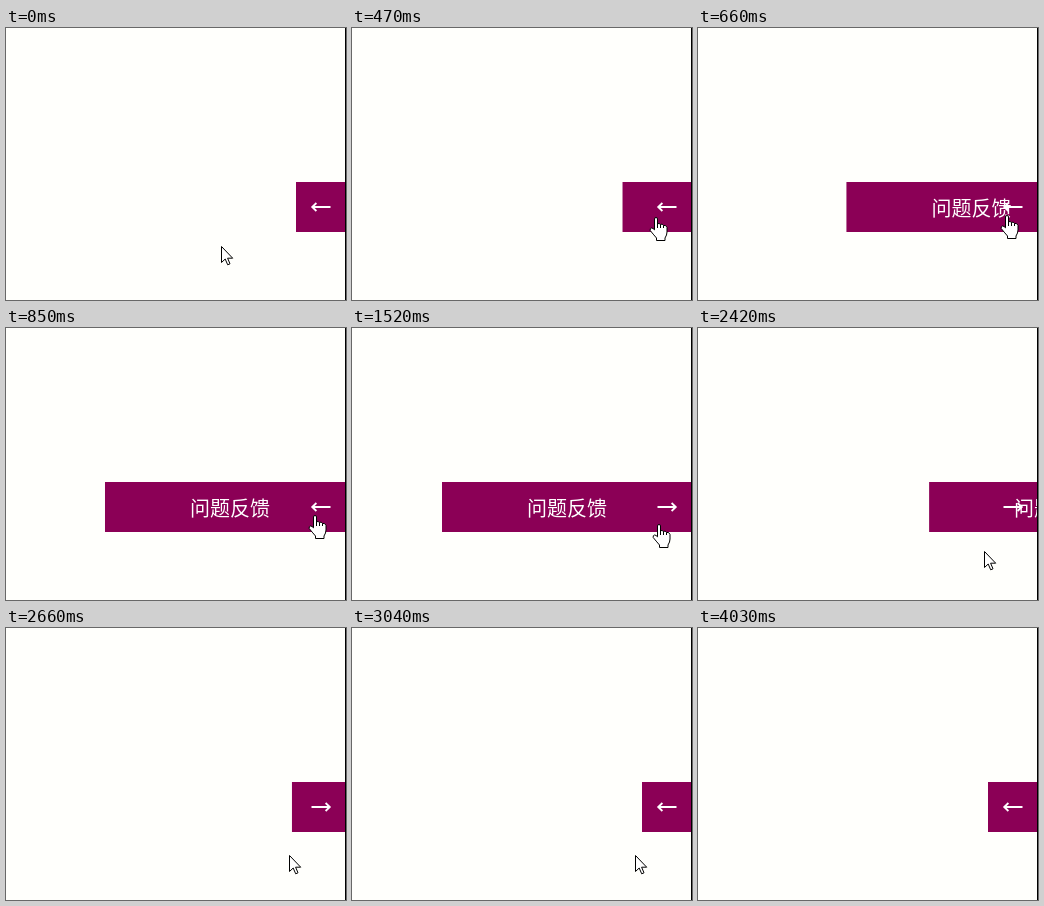
Recreate the animation shown at these times as an HTML page. Size 340 by 272 pixels, loop 5.3 s.

```html
<!DOCTYPE html>
<html lang="zh-CN">
<head>
<meta charset="utf-8">
<title>问题反馈</title>
<style>
  html, body { margin: 0; width: 100%; height: 100%; overflow: hidden; background: #fffffc; }
  svg { display: block; width: 100%; height: 100%; }
  text { font: 20px "Noto Sans CJK SC", "Noto Sans CJK", sans-serif; fill: #fff; }
  .cursor { fill: #fff; stroke: #000; stroke-linejoin: round; }
</style>
</head>
<body>
<svg viewBox="0 0 340 272">
  <g id="panel">
    <rect y="154" width="250" height="50" fill="#8b0056"/>
    <text x="85" y="188">问题反馈</text>
  </g>
  <path id="mark" d="M-9 0H9.5M-4.6-4L-8.8 0L-4.6 4" fill="none" stroke="#fff" stroke-width="1.8"/>
  <rect x="339" width="1" height="272"/>
  <path id="pointer" class="cursor" d="M.5.5V16.5L4.2 13L6.7 18.8L9 17.8L6.6 12.2H11.7Z"/>
  <g id="hand" class="cursor">
    <path d="M-1.5 12V2Q-1.5.5 0 .5T1.5 2V7Q3 5.5 4.5 7.5Q6.3 6.3 7.5 8.5Q10 7.5 11 10.5V15Q11 18 9 21V23.5H.5V21Q-3 17-5.8 13.5Q-6.2 11.3-4.5 11Q-3 11-1.5 12.8Z"/>
    <path d="M1.5 7V11M4.5 7.5V11M7.5 8.5V11" fill="none"/>
  </g>
</svg>
<script>
  const LOOP = 5300, SLIDE = 600;
  const OPEN = 410, CLOSE = 2171;
  const [panel, mark, pointer, hand] =
    ['panel', 'mark', 'pointer', 'hand'].map(id => document.getElementById(id));

  const start = { x: 215, y: 218 };
  const moves = [
    { from: 50, to: 540, x: 309, y: 187 },
    { from: 1519, to: 1520, x: 307, y: 196 },
    { from: 2100, to: 2510, x: 283, y: 227 },
    { from: 3710, to: 4030, x: 278, y: 274 }
  ];

  const clamp = v => Math.min(1, Math.max(0, v));
  const smooth = k => k * k * (3 - 2 * k);

  // cubic-bezier(.25, .1, .25, 1)
  function ease(x) {
    let lo = 0, hi = 1;
    for (let i = 0; i < 24; i++) {
      const s = (lo + hi) / 2;
      if (.75 * s * (1 - s) + s ** 3 < x) lo = s; else hi = s;
    }
    return .3 * lo * (1 - lo) ** 2 + 3 * lo * lo * (1 - lo) + lo ** 3;
  }

  function cursorAt(t) {
    let { x, y } = start;
    for (const m of moves) {
      const k = smooth(clamp((t - m.from) / (m.to - m.from)));
      x += (m.x - x) * k;
      y += (m.y - y) * k;
    }
    return [Math.round(x), Math.round(y)];
  }

  const slide = (t, from) => ease(clamp((t - from) / SLIDE));
  const place = (el, x, y, more = '') => el.setAttribute('transform', `translate(${x} ${y})${more}`);
  const show = (el, on) => el.setAttribute('visibility', on ? 'visible' : 'hidden');

  function draw(t) {
    const open = slide(t, OPEN) - slide(t, CLOSE);
    place(panel, 290 - 200 * open, 0);

    const flipped = t >= OPEN + SLIDE && t < CLOSE + SLIDE;
    place(mark, 315, 179, flipped ? ' scale(-1 1)' : '');

    const hover = t >= OPEN && t < CLOSE;
    const [x, y] = cursorAt(t);
    place(pointer, x, y);
    place(hand, x, y);
    show(pointer, !hover);
    show(hand, hover);
  }

  const begin = performance.now();
  function tick() {
    draw((performance.now() - begin) % LOOP);
    requestAnimationFrame(tick);
  }
  tick();
</script>
</body>
</html>
```
